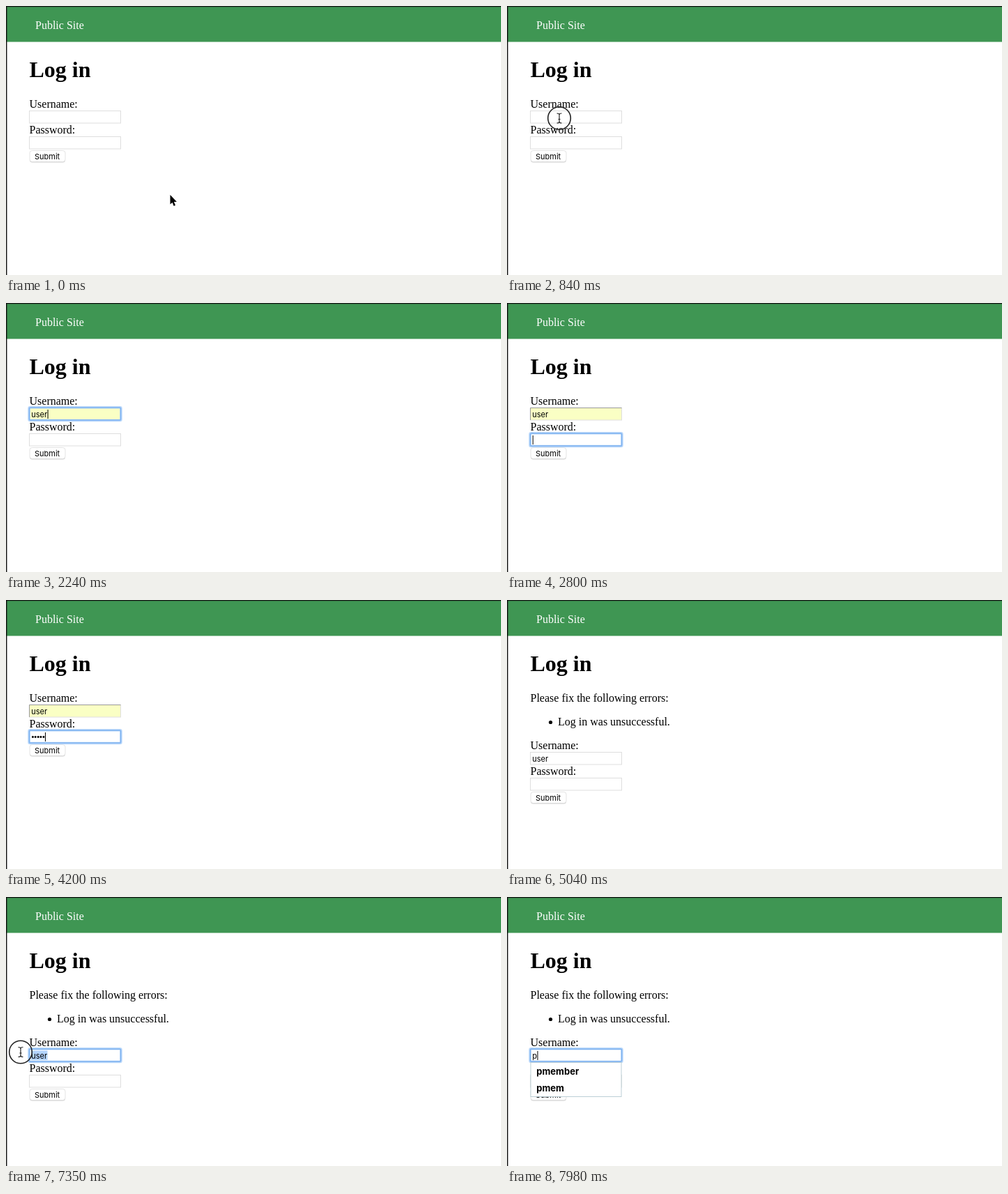
These frames come from a looping animation (710x386 px, 8 s). An HTML page:

```html
<!DOCTYPE html>
<html lang="en">
<head>
<meta charset="utf-8">
<title>Log in</title>
<style>
  html, body { margin: 0; width: 100%; height: 100%; overflow: hidden; background: #fff; }
  svg { display: block; font: 16px "Liberation Serif", serif; fill: #000; }
  h1, .title { font-size: 32px; font-weight: bold; }
  .ui { font: 11px Inter, sans-serif; }
  .dots { font: 11px "Liberation Sans", sans-serif; }
  .field { fill: #fff; stroke: #dedede; }
  .ring { fill: none; stroke: #7fb3f0; stroke-width: 1.6; }
  .glow { fill: none; stroke: #b9d7fa; stroke-width: 3.4; }
  #menu { font: bold 13px Inter, sans-serif; }
  #menuBox { fill: #fff; stroke: #bccfd6; }
</style>
</head>
<body>
<svg width="710" height="386" viewBox="0 0 710 386">
  <rect y="1" width="710" height="50.5" fill="#3f9653"/>
  <path d="M0 .5H710M.75 0V386" stroke="#111" stroke-width="1.4"/>
  <text x="42" y="33" fill="#fff">Public Site</text>
  <text class="title" x="33.5" y="102">Log in</text>

  <g id="errors">
    <text x="33.5" y="146">Please fix the following errors:</text>
    <circle cx="62.5" cy="175.5" r="2.6"/>
    <text x="73" y="180">Log in was unsuccessful.</text>
  </g>

  <g id="form">
    <text x="33.5" y="146">Username:</text>
    <text x="33.5" y="183">Password:</text>
    <rect class="field" id="nameBox" x="33.5" y="150.5" width="131" height="17.5"/>
    <path id="inset" d="M33.5 168V150.5H164.5" fill="none" stroke="#999"/>
    <rect class="field" x="33.5" y="187.5" width="131" height="17.5"/>
    <rect x="34" y="208" width="51" height="16.5" rx="3.5" fill="#ccc"/>
    <rect x="34" y="207.5" width="51" height="16" rx="3.5" fill="#fff" stroke="#ddd" stroke-width=".8"/>
    <text class="ui" x="41" y="219.5">Submit</text>
    <g id="focus">
      <rect class="glow" x="33" y="149.7" width="132" height="18.8" rx="1.5"/>
      <rect class="ring" x="33.5" y="150.2" width="131" height="17.8" rx="1"/>
    </g>
    <rect id="selection" x="36" y="152.5" width="23.5" height="13.5" fill="#b3d4fd"/>
    <text class="ui" id="name" x="36.3" y="163.5"></text>
    <text class="dots" id="password" x="36.5" y="200.3"></text>
    <rect id="caret" y="153" width="1" height="13"/>
    <g id="menu">
      <rect id="menuBox" x="34" y="169.5" width="130"/>
    </g>
  </g>

  <g id="pointer">
    <path id="arrow" d="M0 0V13.6L3.1 10.9L5.2 15.9L7.5 15L5.4 10H9.4Z" stroke="#fff" stroke-width="1" paint-order="stroke"/>
    <path id="beam" d="M-3.5 -7Q0 -7 0 -5Q0 -7 3.5 -7M0 -5V5M-3.5 7Q0 7 0 5Q0 7 3.5 7M-1.5 1.5H1.5" fill="none" stroke="#222" stroke-width="1.2"/>
    <circle id="click" fill="none" stroke="#222" stroke-width="1.6"/>
  </g>
</svg>
<script>
const LOOP = 8000, STEP = 70;
const $ = id => document.getElementById(id);
const set = (id, attrs) => { for (const k in attrs) $(id).setAttribute(k, attrs[k]); };
const show = (id, on) => set(id, { visibility: on ? "visible" : "hidden" });
const during = (t, ...spans) => spans.some(([from, to]) => t >= from && t < to);

// [time, value] lists: the value holds until the next entry
const last = (list, t) => list.filter(([start]) => start <= t).pop()[1];

const nameText = [[0, ""], [1400, "u"], [1610, "us"], [1680, "use"], [1750, "user"], [7840, "p"]];
const dotCount = [[0, 0], [3710, 1], [3780, 2], [3850, 3], [3920, 4], [4060, 5], [4970, 0]];
const suggestions = [
  [0, []], [1050, ["pmember", "pmem", "admin", "user"]], [1400, ["user"]], [2100, []],
  [7420, ["user"]], [7840, ["pmember", "pmem"]]
];
const presses = [[350, 490], [840, 980], [6720, 7350]];
const path = [
  [0, 235.5, 271], [140, 75, 161], [6300, 75, 161], [6440, 61.5, 186], [6650, 64, 224],
  [7140, 64, 224], [7350, 21, 222.5], [LOOP, 21, 222.5]
];

function pointerAt(t) {
  const i = path.findIndex(p => p[0] > t);
  const [t0, x0, y0] = path[i - 1], [t1, x1, y1] = path[i];
  const k = (t - t0) / (t1 - t0);
  return [x0 + (x1 - x0) * k, y0 + (y1 - y0) * k];
}

function drawPointer(t) {
  const [x, y] = pointerAt(t);
  set("pointer", { transform: `translate(${x} ${y})` });
  show("arrow", during(t, [0, 140], [6090, 6580]));
  show("beam", during(t, [140, 1400], [6580, 7840]));
  const press = presses.find(([down, up]) => during(t, [down, up + 140]));
  const fade = press ? Math.max(0, (t - press[1]) / 140) : 1;
  set("click", { r: 16.3 + 5.5 * fade, opacity: 1 - fade });
}

function drawMenu(items) {
  show("menu", items.length);
  set("menuBox", { height: 1 + 24 * items.length });
  document.querySelectorAll("#menu text").forEach(e => e.remove());
  items.forEach((item, i) => {
    const text = document.createElementNS("http://www.w3.org/2000/svg", "text");
    text.textContent = item;
    text.setAttribute("x", 42.3);
    text.setAttribute("y", 187 + 24 * i);
    $("menu").append(text);
  });
}

function draw(t) {
  const failed = t >= 4970;
  const inName = during(t, [910, 2660], [6720, LOOP]);
  const inPassword = during(t, [2660, 4970]);
  const filled = during(t, [2100, 4970]);
  const selected = during(t, [7280, 7840]);

  show("errors", failed);
  set("form", { transform: `translate(0 ${failed ? 68 : 0})` });
  $("nameBox").style.fill = filled ? "#faffc4" : "#fff";
  show("inset", filled && !inName);
  $("name").textContent = last(nameText, t);
  $("password").textContent = "•".repeat(last(dotCount, t));

  show("focus", inName || inPassword);
  set("focus", {
    transform: `translate(0 ${inPassword ? 37 : 0})`,
    opacity: during(t, [910, 980], [2660, 2730], [6720, 6790]) ? 0.6 : 1
  });
  show("selection", selected);
  const blinkOff = during(t, [3220, 3710], [4550, 4970]);
  show("caret", (inName || inPassword) && !selected && !blinkOff);
  const typed = $(inPassword ? "password" : "name");
  set("caret", { x: 36.7 + typed.getComputedTextLength(), y: inPassword ? 190 : 153 });

  drawMenu(last(suggestions, t));
  drawPointer(t);
}

function tick() {
  const t = performance.now() % LOOP;
  draw(Math.floor(t / STEP) * STEP);
  requestAnimationFrame(tick);
}
tick();
</script>
</body>
</html>
```
